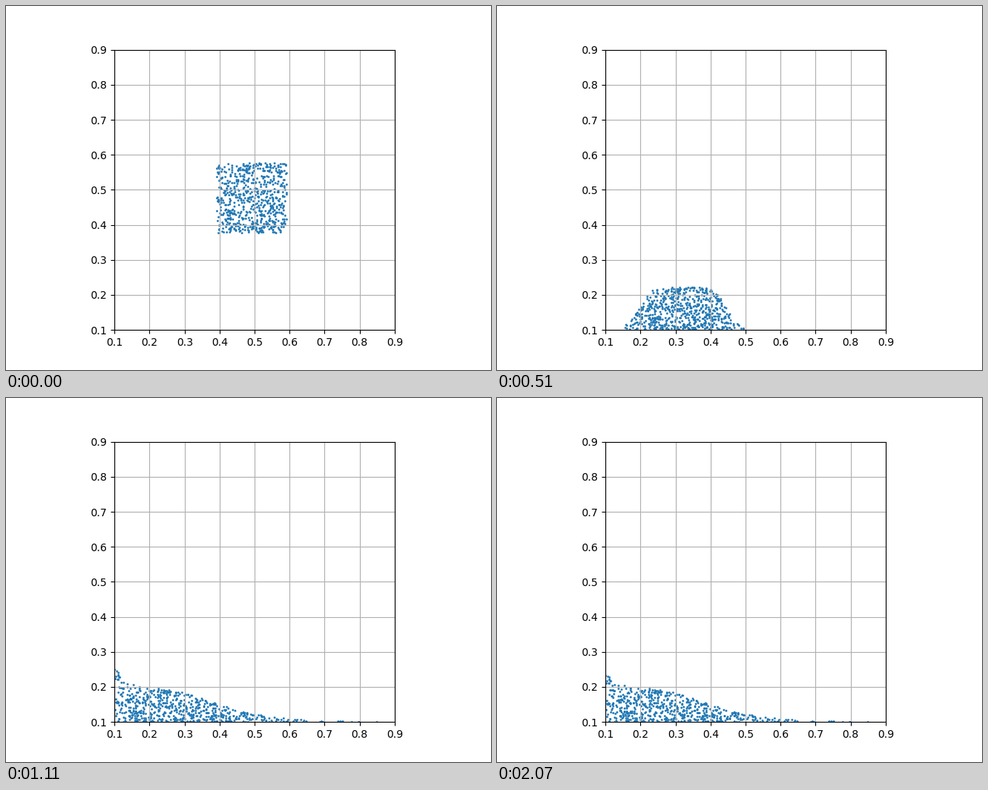
A matplotlib script for the animation above (2100 ms loop, 640 by 480 pixels).

```python
import numpy as np
import matplotlib.pyplot as plt
from matplotlib.animation import FuncAnimation

FRAMES, INTERVAL = 70, 30
COUNT = 630
IMPACT, SPREAD, REST = 14, 18, 31
FLOOR, LEFT, RIGHT = 0.098, 0.1, 0.9

rng = np.random.default_rng(7)
u, v = rng.random((2, COUNT))


def fall(n):
    """Rigid block of grains in free flight."""
    x = 0.3915 - 0.0102 * n + 0.2 * u
    y = 0.377 - 0.00925 * n - 0.00075 * n**2 + 0.2 * v
    return np.array([x, y])


def heap(lo, hi, center, width, height, power):
    """Spread the grains evenly below a bell that thins out towards hi."""
    def outline(x):
        bell = height / (1 + np.abs((x - center) / width) ** power)
        return bell * np.clip((hi - x) / 0.1, 0, 1)

    grid = np.linspace(lo, hi, 1200)
    mass = np.cumsum(outline(grid))
    x = np.interp(u, mass / mass[-1], grid)
    return np.array([x, FLOOR + v * outline(x)])


def wall_lift(x, n):
    """Grains thrown up the left wall sag back, a few climb the right one."""
    if n < REST:
        splash = 0.092 * max(0, n - SPREAD) / (REST - SPREAD)
        climb = 0
    else:
        decay = np.exp(-(n - REST) / 9)
        splash = 0.05 + 0.042 * decay
        climb = 0.01 * (1 - decay)
    left = splash * np.exp(-(x - LEFT) / 0.028) * v**2
    right = climb * np.clip((x - 0.84) / 0.06, 0, 1)
    return left + right


POSES = [
    (IMPACT, fall(IMPACT)),
    (16, heap(0.2, 0.53, 0.335, 0.105, 0.137, 8)),
    (SPREAD, heap(LEFT, 0.59, 0.305, 0.145, 0.112, 6)),
    (22, heap(LEFT, 0.7, LEFT, 0.38, 0.102, 6)),
    (REST, heap(LEFT, RIGHT, LEFT, 0.305, 0.1, 4)),
]


def grains(n):
    if n <= IMPACT:
        return fall(n)
    x, y = POSES[-1][1]
    for (a, start), (b, end) in zip(POSES, POSES[1:]):
        if a <= n < b:
            x, y = start + (n - a) / (b - a) * (end - start)
    return np.array([x, y + wall_lift(x, n)])


fig, ax = plt.subplots(figsize=(6.4, 4.8), dpi=100)
ax.set_aspect("equal")
ax.set_xlim(LEFT, RIGHT)
ax.set_ylim(0.1, 0.9)
ax.grid(True)
dots = ax.scatter(*grains(0), s=1)


def update(n):
    dots.set_offsets(grains(n).T)
    return (dots,)


anim = FuncAnimation(fig, update, frames=FRAMES, interval=INTERVAL,
                     repeat=True, repeat_delay=0)
plt.show()
```
